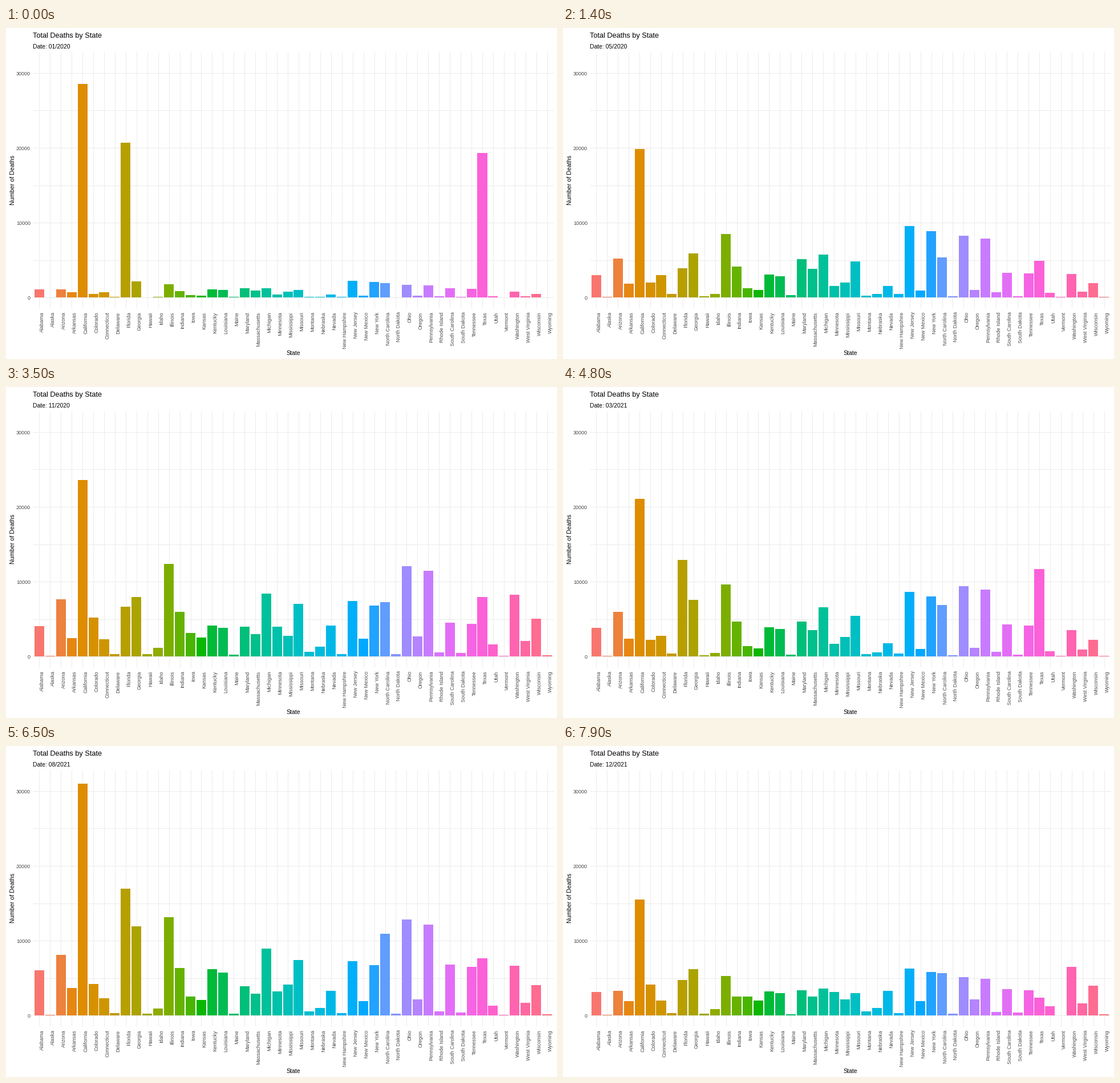
Recreate the animation shown at these times as a matplotlib script. Size 966 by 580 pixels, loop 8000 ms.

```python
import numpy as np
import matplotlib.pyplot as plt
from matplotlib.animation import FuncAnimation
from matplotlib.lines import Line2D
from matplotlib.patches import Rectangle

W, H, DPI = 966, 580, 100
PT = 72 / DPI
FRAMES, INTERVAL = 80, 100
LEFT, RIGHT, TOP, BOTTOM = 47, 960, 42, 491
ZERO, SCALE = 472.3, 1.312          # zero line, pixels per hundred deaths
STEP = (RIGHT - LEFT) / 48.2
MONTHS_PER_FRAME = 0.297
KEYS = (0, 14, 26, 35, 48, 65, 79)

plt.rcParams["font.family"] = "Liberation Sans"

# Each regional wave scales the typical size (hundreds) of its states.
REGIONS = [
    ((0.92, 0.64, 0.93, 0.76, 0.68, 1.00, 0.50), {"California": 309.5}),
    ((1.22, 0.23, 0.74, 0.39, 0.76, 1.00, 0.28), {"Florida": 169.5}),
    ((1.39, 0.35, 1.00, 0.57, 0.84, 0.55, 0.17), {"Texas": 138.5}),
    ((0.26, 0.72, 1.13, 0.98, 0.93, 1.47, 0.76), {
        "Alabama": 41, "Arkansas": 25, "Georgia": 81, "Kentucky": 42,
        "Louisiana": 39, "Mississippi": 28, "North Carolina": 74,
        "South Carolina": 46, "Tennessee": 44}),
    ((0.33, 1.42, 0.18, 1.10, 1.29, 1.08, 0.93), {
        "Connecticut": 21, "Delaware": 3, "Maine": 2, "Maryland": 36,
        "Massachusetts": 27, "New Hampshire": 3, "New Jersey": 67,
        "New York": 62, "Rhode Island": 5, "Vermont": 0.4}),
    ((0.18, 0.87, 0.96, 1.27, 0.99, 1.35, 0.54), {
        "Arizona": 60, "Illinois": 97, "Indiana": 47, "Michigan": 66,
        "Missouri": 55, "Ohio": 95, "Pennsylvania": 90}),
    ((0.14, 0.60, 0.65, 1.58, 0.68, 1.27, 1.25), {
        "Alaska": 0.7, "Colorado": 33, "Hawaii": 2, "Idaho": 7, "Iowa": 20,
        "Kansas": 16, "Minnesota": 25, "Montana": 4, "Nebraska": 8,
        "Nevada": 26, "New Mexico": 15, "North Dakota": 2, "Oregon": 17,
        "South Dakota": 3, "Utah": 10, "Washington": 52,
        "West Virginia": 13, "Wisconsin": 32, "Wyoming": 1}),
]
STATES = sorted((name, size, wave) for wave, sizes in REGIONS
                for name, size in sizes.items())


def hcl(hue, chroma=100, lum=65):
    """Polar CIE-LUV to clipped sRGB."""
    h = np.radians(hue)
    y = ((lum + 16) / 116) ** 3
    u = chroma * np.cos(h) / (13 * lum) + 0.1978398
    v = chroma * np.sin(h) / (13 * lum) + 0.4683363
    x = 9 * y * u / (4 * v)
    z = y * (12 - 3 * u - 20 * v) / (4 * v)
    rgb = np.array([3.240479 * x - 1.537150 * y - 0.498535 * z,
                    -0.969256 * x + 1.875992 * y + 0.041556 * z,
                    0.055648 * x - 0.204043 * y + 1.057311 * z])
    rgb = np.clip(rgb, 0, 1)
    return np.where(rgb > 0.0031308, 1.055 * rgb ** (1 / 2.4) - 0.055, 12.92 * rgb)


fig = plt.figure(figsize=(W / DPI, H / DPI), dpi=DPI, facecolor="white")
ax = fig.add_axes([0, 0, 1, 1])
ax.set(xlim=(0, W), ylim=(H, 0))
ax.axis("off")


def text(x, y, s, px, color="black", **kw):
    return ax.text(x, y, s, fontsize=px * PT, color=color,
                   rotation_mode="anchor", **kw)


def grid(xs, ys):
    ax.add_line(Line2D(xs, ys, color="#EBEBEB", lw=PT,
                       solid_capstyle="butt", zorder=1))


for hundreds in range(0, 301, 50):
    y = ZERO - hundreds * SCALE
    grid((LEFT, RIGHT), (y, y))
    if hundreds % 100 == 0:
        text(43, y + 4, str(hundreds * 100), 9, "#4D4D4D", ha="right")

bars = []
for i, (name, _, _) in enumerate(STATES):
    x = LEFT + (i + 0.6) * STEP
    grid((x, x), (TOP, BOTTOM))
    text(x + 8, 497.5, name, 9, "#4D4D4D", rotation=90, ha="right")
    bar = Rectangle((x - 0.45 * STEP, 472), 0.9 * STEP, 0, lw=0, zorder=2,
                    color=hcl(15 + 360 * i / len(STATES)))
    bars.append(ax.add_patch(bar))

text(47, 16.7, "Total Deaths by State", 12.7)
date = text(47, 36, "", 10.4)
text(504, 573, "State", 10.5, ha="center")
text(15, 266, "Number of Deaths", 10.6, rotation=90, ha="center")


def update(k):
    month = int(k * MONTHS_PER_FRAME)
    date.set_text(f"Date: {month % 12 + 1:02d}/{2020 + month // 12}")
    for bar, (_, size, wave) in zip(bars, STATES):
        bar.set_height(-SCALE * size * np.interp(k, KEYS, wave))
    return [date, *bars]


anim = FuncAnimation(fig, update, frames=FRAMES, interval=INTERVAL,
                     repeat=True, repeat_delay=0, blit=False)
plt.show()
```
